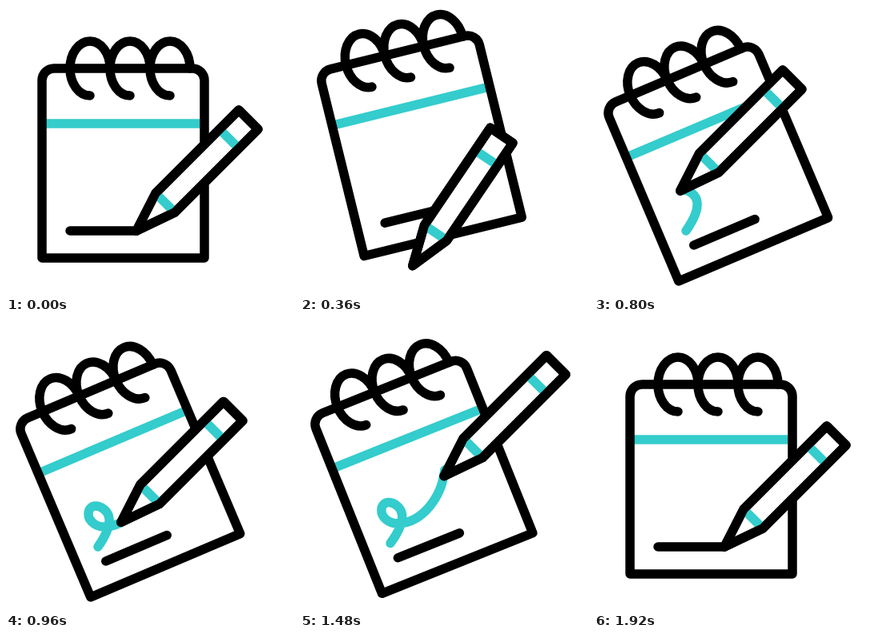
An HTML page that plays this animation: 360x360 px, repeating every 2000 ms.

```html
<!DOCTYPE html>
<html lang="en">
<head>
<meta charset="utf-8">
<title>Notepad and pencil</title>
<style>
  html, body { margin: 0; width: 100%; height: 100%; overflow: hidden; background: #fff; }
  svg { display: block; width: 100vw; height: 100vh; }
  path { fill: none; stroke: #000; stroke-width: 11.5; stroke-linecap: round; stroke-linejoin: round; }
  .teal { stroke: #34cccc; }
  .flat { stroke-linecap: butt; }
  .paper { fill: #fff; }
</style>
</head>
<body>
<svg viewBox="0 0 360 360">
  <g id="pad">
    <path class="teal flat" d="M45 147H248"/>
    <path d="M45 315V93A15 15 0 0 1 60 78H233A15 15 0 0 1 248 93V315Z"/>
    <path id="ring" d="M105 112A25 34 0 0 1 80 78A25 34 0 0 1 130 78"/>
    <use href="#ring" x="50"/>
    <use href="#ring" x="100"/>
    <path d="M80 281H163"/>
    <!-- the scribble is laid out for the tilted pad -->
    <g transform="rotate(23 146.5 180)">
      <path id="scribble" class="teal" d="M115 281C122 271 130 257 129 246C128 236 119 230 112 230C106 230 103 235 103 240C103 249 113 257 125 256C154 254 178 223 181 188"/>
    </g>
  </g>
  <!-- the pencil tip is the origin -->
  <g id="pen">
    <path class="paper" d="M0 0L24-47L128-151L152-127L48-23Z"/>
    <path class="teal flat" d="M24-47l24 24M104-127l24 24"/>
    <path d="M0 0L24-47L128-151L152-127L48-23Z"/>
  </g>
</svg>
<script>
const LOOP = 2000, STEP = 40, TILT = 23, LIFT = 24;
const [pad, pen, scribble] = ['pad', 'pen', 'scribble'].map(id => document.getElementById(id));
const total = scribble.getTotalLength();
const rest = { x: 163, y: 281 };
const first = scribble.getPointAtLength(0);
const last = scribble.getPointAtLength(total);

// soft ease in and out between two times
function ease(t, from, to) {
  const u = Math.min(1, Math.max(0, (t - from) / (to - from)));
  return u / 2 + (1 - Math.cos(Math.PI * u)) / 4;
}

const mix = (a, b, k) => ({ x: a.x + (b.x - a.x) * k, y: a.y + (b.y - a.y) * k });

function draw(t) {
  const out = ease(t, 140, 520);
  const write = ease(t, 550, 1230);
  const back = ease(t, 1440, 1920);
  const swing = Math.sin(Math.PI * out);
  const hop = LIFT * (swing + Math.sin(Math.PI * back));

  pad.setAttribute('transform',
    `translate(0 ${-hop}) rotate(${-TILT * (out - back)} 146.5 180)`);

  const ink = total * write * (1 - back * back);
  scribble.style.display = ink > 0.1 ? '' : 'none';
  scribble.style.strokeDasharray = `${ink} 999`;

  let tip;
  if (back > 0) tip = mix(last, rest, back);
  else if (write > 0) tip = scribble.getPointAtLength(total * write);
  else tip = mix(rest, first, out);
  pen.setAttribute('transform',
    `translate(${tip.x + 7 * swing} ${tip.y + 46 * swing}) rotate(${-11.5 * swing})`);
}

const start = performance.now();
function tick() {
  const t = (performance.now() - start) % LOOP;
  draw(Math.floor(t / STEP) * STEP);
  requestAnimationFrame(tick);
}
tick();
</script>
</body>
</html>
```
